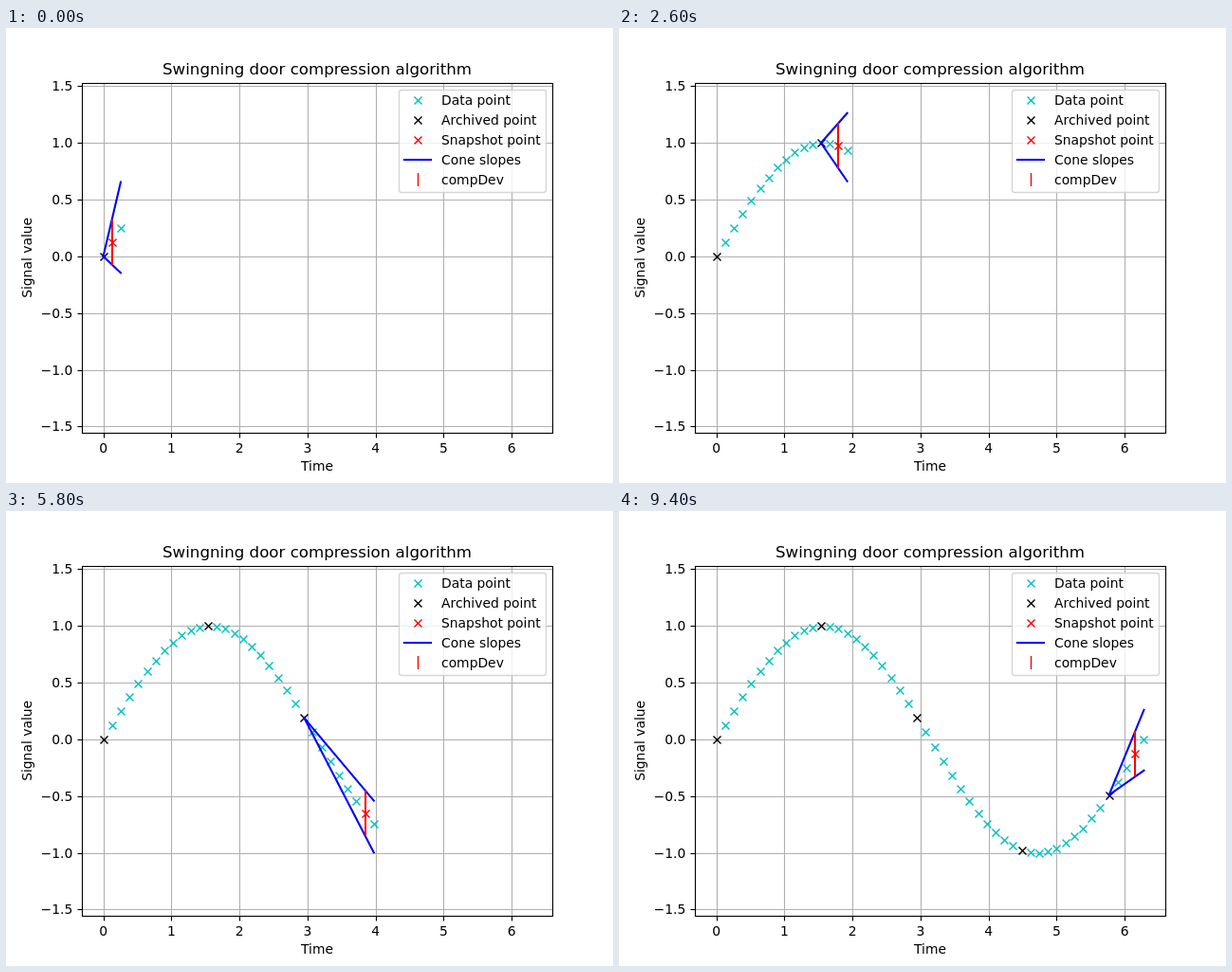
Recreate the animation shown at these times as an HTML page with a canvas. Size 640 px wide and 480 px high, loop 9.6 s.

```html
<!DOCTYPE html>
<html lang="en">
<head>
<meta charset="utf-8">
<title>Swinging door compression</title>
<style>
  html, body { margin: 0; width: 100%; height: 100%; overflow: hidden; background: #fff; }
  canvas { display: block; }
</style>
</head>
<body>
<canvas id="stage" width="640" height="480"></canvas>
<script>
const ctx = document.getElementById("stage").getContext("2d");

const STEP_MS = 200, POINTS = 50, STEPS = POINTS - 2, DEV = 0.2;
const PT = 100 / 72;
const FONT = "'DejaVu Sans', sans-serif";
const CYAN = "#00bfbf", BLACK = "#000", RED = "#f00", BLUE = "#00f";
const AXES = { left: 80, right: 576, top: 57.6, bottom: 427.2 };

const timeAt = i => i * 2 * Math.PI / (POINTS - 1);
const valueAt = i => Math.sin(timeAt(i));

// Swinging door: the cone narrows with each snapshot; a point outside it archives the snapshot.
function compress() {
  const steps = [], archived = [0];
  let upper = Infinity, lower = -Infinity;
  for (let k = 0; k < STEPS; k++) {
    const snapshot = k + 1, current = k + 2, base = archived[archived.length - 1];
    const slope = (i, offset) => (valueAt(i) + offset - valueAt(base)) / (timeAt(i) - timeAt(base));
    upper = Math.min(upper, slope(snapshot, DEV));
    lower = Math.max(lower, slope(snapshot, -DEV));
    const reach = timeAt(current) - timeAt(base);
    steps.push({
      snapshot, current, base, archived: [...archived],
      ends: [upper, lower].map(s => valueAt(base) + s * reach)
    });
    const incoming = slope(current, 0);
    if (incoming > upper || incoming < lower) {
      archived.push(snapshot);
      upper = Infinity;
      lower = -Infinity;
    }
  }
  return steps;
}

const steps = compress();

// Limits enclose every cone, with a 5% margin on each side.
function limits(values) {
  const min = Math.min(...values), max = Math.max(...values), pad = (max - min) * 0.05;
  return [min - pad, max + pad];
}
const [xMin, xMax] = limits([0, 2 * Math.PI]);
const [yMin, yMax] = limits(steps.flatMap(s => s.ends));
const px = x => AXES.left + (x - xMin) / (xMax - xMin) * (AXES.right - AXES.left);
const py = y => AXES.top + (yMax - y) / (yMax - yMin) * (AXES.bottom - AXES.top);
const crisp = v => Math.round(v) + 0.5;

function line(x1, y1, x2, y2, color, width, cap = "butt") {
  ctx.strokeStyle = color;
  ctx.lineWidth = width;
  ctx.lineCap = cap;
  ctx.beginPath();
  ctx.moveTo(x1, y1);
  ctx.lineTo(x2, y2);
  ctx.stroke();
}

function cross(x, y, color) {
  const cx = crisp(x), cy = crisp(y);
  line(cx - 4, cy - 4, cx + 4, cy + 4, color, PT);
  line(cx - 4, cy + 4, cx + 4, cy - 4, color, PT);
}

function text(str, x, y, align = "center", size = 10) {
  ctx.font = `${size * PT}px ${FONT}`;
  ctx.textAlign = align;
  ctx.fillStyle = BLACK;
  ctx.fillText(str, x, y);
}

function drawAxes() {
  const left = crisp(AXES.left), right = crisp(AXES.right);
  const top = crisp(AXES.top), bottom = crisp(AXES.bottom);
  const thin = 0.8 * PT, grid = "#b0b0b0";
  const xTicks = [0, 1, 2, 3, 4, 5, 6], yTicks = [-1.5, -1, -0.5, 0, 0.5, 1, 1.5];

  for (const t of xTicks) line(crisp(px(t)), top, crisp(px(t)), bottom, grid, thin);
  for (const v of yTicks) line(left, crisp(py(v)), right, crisp(py(v)), grid, thin);
  for (const t of xTicks) {
    line(crisp(px(t)), bottom, crisp(px(t)), bottom + 5, BLACK, thin);
    text(String(t), px(t), 448);
  }
  for (const v of yTicks) {
    line(left - 5, crisp(py(v)), left, crisp(py(v)), BLACK, thin);
    text(v.toFixed(1).replace("-", "\u2212"), 70.3, Math.round(py(v) + 5), "right");
  }
  ctx.strokeStyle = BLACK;
  ctx.lineWidth = thin;
  ctx.strokeRect(left, top, right - left, bottom - top);

  text("Swingning door compression algorithm", 328, 49, "center", 12);
  text("Time", 328, 467);
  ctx.save();
  ctx.translate(27, 242.4);
  ctx.rotate(-Math.PI / 2);
  text("Signal value", 0, 0);
  ctx.restore();
}

function drawLegend() {
  ctx.beginPath();
  ctx.roundRect(414.5, 65.5, 155, 108, 2.8);
  ctx.fillStyle = "rgba(255,255,255,0.8)";
  ctx.fill();
  ctx.strokeStyle = "rgba(204,204,204,0.8)";
  ctx.lineWidth = PT;
  ctx.stroke();

  const entries = [
    ["Data point", y => cross(434, y, CYAN)],
    ["Archived point", y => cross(434, y, BLACK)],
    ["Snapshot point", y => cross(434, y, RED)],
    ["Cone slopes", y => line(420, y, 448, y, BLUE, 1.5 * PT, "square")],
    ["compDev", y => line(434.5, y - 7, 434.5, y + 7, RED, PT)]
  ];
  entries.forEach(([label, drawHandle], row) => {
    const y = 76 + row * 21;
    drawHandle(y);
    text(label, 459, y + 5, "left");
  });
}

function drawStep({ snapshot, current, base, archived, ends }) {
  const mark = (i, color) => cross(px(timeAt(i)), py(valueAt(i)), color);
  for (let i = 0; i <= current; i++) {
    if (i !== snapshot && !archived.includes(i)) mark(i, CYAN);
  }
  archived.forEach(i => mark(i, BLACK));
  mark(snapshot, RED);
  for (const end of ends) {
    line(px(timeAt(base)), py(valueAt(base)), px(timeAt(current)), py(end), BLUE, 1.5 * PT, "square");
  }
  const x = Math.round(px(timeAt(snapshot))), v = valueAt(snapshot);
  line(x, Math.round(py(v + DEV)), x, Math.round(py(v - DEV)), RED, 1.5 * PT);
}

const start = performance.now();
function render() {
  const elapsed = Math.max(0, performance.now() - start);
  ctx.fillStyle = "#fff";
  ctx.fillRect(0, 0, 640, 480);
  drawAxes();
  drawStep(steps[Math.floor(elapsed / STEP_MS) % STEPS]);
  drawLegend();
  requestAnimationFrame(render);
}
render();
</script>
</body>
</html>
```
